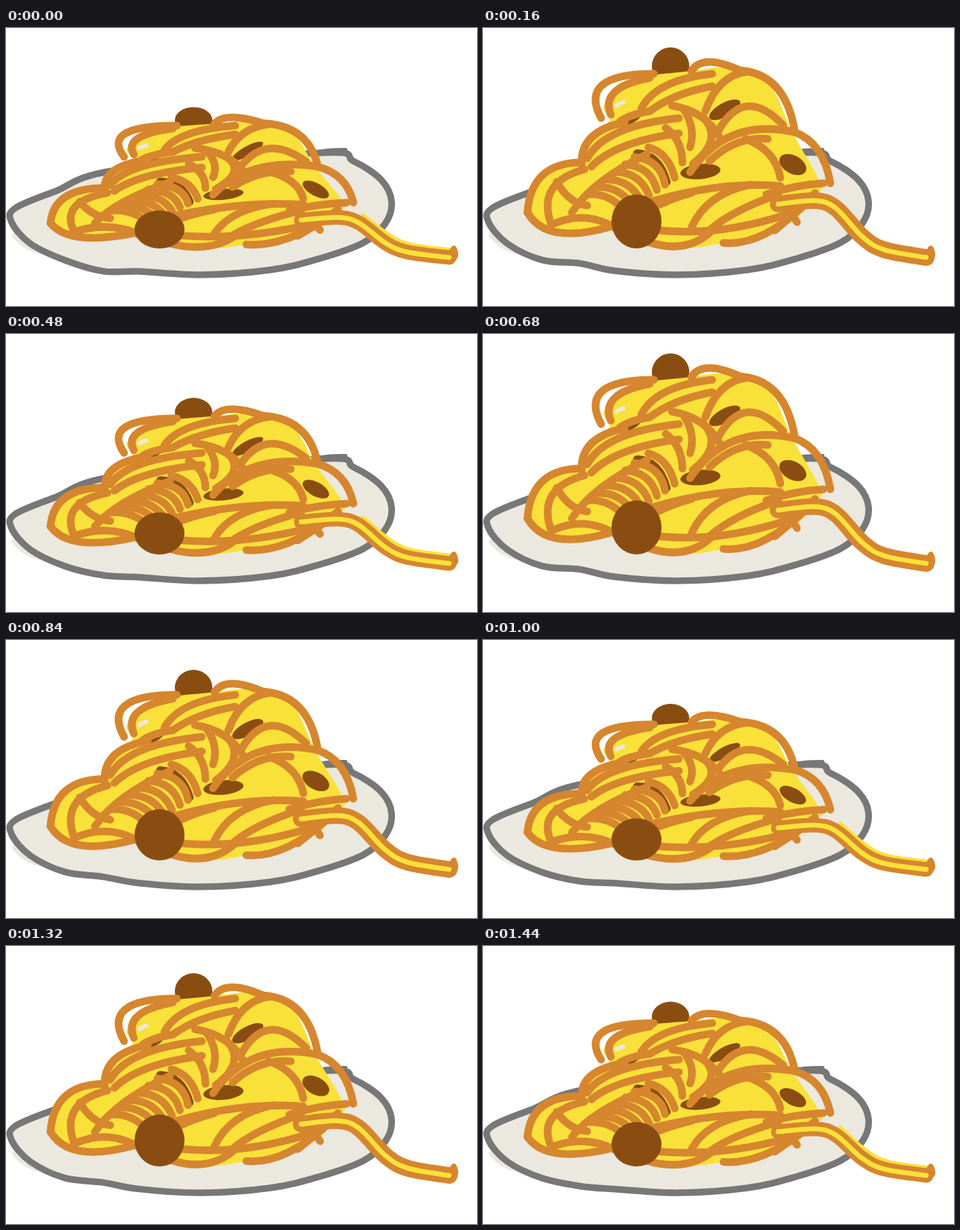
Write an HTML page with a canvas that moves like this. It is 678 px wide and 401 px high and loops after 1520 ms.

```html
<!DOCTYPE html>
<html lang="en">
<head>
<meta charset="utf-8">
<title>Bouncing spaghetti</title>
<style>
html, body { margin: 0; width: 100%; height: 100%; overflow: hidden; background: #fff; }
canvas { display: block; }
</style>
</head>
<body>
<canvas id="stage" width="678" height="401"></canvas>
<script>
const ctx = document.getElementById('stage').getContext('2d');
const ORANGE = '#d6862e', YELLOW = '#f9e13a', BROWN = '#8a4d11', GREY = '#777', CREAM = '#ebe8df';
const LOOP = 1520, BOUNCE = 520, STEP = 40;
const FLOOR = 318, TAIL_FLOOR = 331;

// Height of the pile over one bounce: [ms, share of full height].
const KEYS = [[0, .703], [160, 1], [320, .948], [400, .82], [440, .82], [480, .779], [520, .703]];

const parse = s => s.split(' ').map(p => p.split(',').map(Number));
const mix = (a, b, u) => a + (b - a) * u;
const squash = (pts, h, floor = FLOOR) => pts.map(([x, y]) => [x, floor - (floor - y) * h]);

const RIM = parse('455,180 500,192 540,219 555,250 546,282 514,310 450,333 380,349 280,356 190,351 140,351 85,335 35,311 8,280 13,260 70,236 160,205');
const SPILL = parse('10,296 22,314 48,326 80,325 60,300');
const TAIL = parse('425,254 478,249 508,260 546,301 578,320 638,331');
const BODY = parse('62,260 80,218 138,192 150,156 182,134 174,112 205,76 300,62 355,58 412,82 445,150 484,220 482,240 435,285 345,310 280,316 190,290 90,292');

// Each noodle runs through three points: start, middle, end.
const noodle = s => parse(s);
function fan(first, last, count) {
  const a = parse(first), b = parse(last);
  return Array.from({ length: count }, (_, i) =>
    a.map((p, j) => p.map((v, c) => mix(v, b[j][c], i / (count - 1)))));
}

const UPPER = [
  ...['170,130 172,82 246,66', '184,125 190,92 240,72', '197,135 215,126 240,120'].map(noodle),
  ...fan('228,116 264,83 330,66', '240,120 280,98 330,84', 2),
  ...['320,120 344,80 380,63', '300,62 326,49 372,62', '365,61 421,84 449,150'].map(noodle)
];
const MIDDLE = [
  ...fan('238,172 262,187 276,216', '288,116 300,144 298,172', 3),
  ...['272,112 314,128 342,160', '318,130 328,162 302,196'].map(noodle),
  ...fan('142,198 156,158 204,136', '156,200 205,170 282,152', 2),
  ...['150,188 196,150 282,130', '128,266 170,222 236,182'].map(noodle),
  ...fan('152,240 180,245 204,264', '218,186 248,198 262,226', 6),
  ...['64,266 86,212 142,194', '64,266 108,295 186,286', '97,280 100,232 146,204',
    '106,222 126,246 150,256', '98,284 148,274 196,292'].map(noodle)
];
const LOWER = [
  ...['338,150 380,113 432,140', '298,208 362,154 448,150', '448,150 482,176 500,224',
    '326,192 366,166 410,160', '378,160 412,182 428,216'].map(noodle),
  ...['225,256 330,231 428,228', '408,240 450,229 490,224', '240,262 270,248 300,238'].map(noodle),
  ...fan('300,288 332,248 385,226', '328,290 368,264 425,240', 2),
  ...['192,286 270,315 330,292', '225,288 330,292 440,268', '346,310 402,299 462,256',
    '412,242 432,254 452,280', '478,238 452,264 420,292'].map(noodle)
];

// Sauce pieces: x, y, width radius, height radius, tilt.
const CHUNKS = [[348, 118, 25, 10, -.5], [313, 207, 29, 11, -.1], [446, 197, 21, 13, .5], [214, 131, 15, 6, -.5]];
const TOP_BALL = [270, 55, 27, 27, 0], LOW_BALL = [221, 279, 36, 39, 0];

// Smooth curve through all points.
function curve(pts, closed) {
  const n = pts.length, path = new Path2D();
  const at = i => closed ? pts[(i + n) % n] : pts[Math.max(0, Math.min(n - 1, i))];
  path.moveTo(...pts[0]);
  for (let i = 0; i < (closed ? n : n - 1); i++) {
    const [a, b, c, d] = [at(i - 1), at(i), at(i + 1), at(i + 2)];
    path.bezierCurveTo(
      b[0] + (c[0] - a[0]) / 6, b[1] + (c[1] - a[1]) / 6,
      c[0] - (d[0] - b[0]) / 6, c[1] - (d[1] - b[1]) / 6, c[0], c[1]);
  }
  return path;
}

// Parabola whose middle lies on the second point.
function arc([a, m, b]) {
  const path = new Path2D();
  path.moveTo(...a);
  path.quadraticCurveTo(2 * m[0] - (a[0] + b[0]) / 2, 2 * m[1] - (a[1] + b[1]) / 2, ...b);
  return path;
}

function fill(path, color) {
  ctx.fillStyle = color;
  ctx.fill(path);
}

function stroke(path, color, width) {
  ctx.strokeStyle = color;
  ctx.lineWidth = width;
  ctx.stroke(path);
}

function lump([x, y, rx, ry, tilt], h) {
  const path = new Path2D();
  path.ellipse(x, FLOOR - (FLOOR - y) * h, rx, ry * h, tilt, 0, 7);
  fill(path, BROWN);
}

function drawPlate(h) {
  // The rim dents at the lower left as the pile rises.
  const dent = (x, y) => y > 300 ? 38 * (h - .7) * Math.exp(-(((x - 140) / 30) ** 2)) : 0;
  const rim = curve(RIM.map(([x, y]) => [x, y - dent(x, y)]), true);
  fill(curve(SPILL, true), CREAM);
  fill(rim, CREAM);
  stroke(rim, GREY, 9.5);
  stroke(curve(parse('445,179 468,176 489,175.5')), GREY, 5);
}

function drawTail(h) {
  const core = squash(TAIL, h, TAIL_FLOOR), firm = h > .9;
  if (!firm) stroke(curve(core.slice(2).map(([x, y]) => [x + 6, y - 9])), YELLOW, 9);
  stroke(curve(core), ORANGE, firm ? 24 : 21);
  stroke(curve(core), YELLOW, 7);
  stroke(curve(parse('641,322 645,317 648,328 642,336')), ORANGE, 6);
}

function draw(h) {
  const noodles = set => set.forEach(n => stroke(arc(squash(n, h)), ORANGE, 11));
  ctx.fillStyle = '#fff';
  ctx.fillRect(0, 0, 678, 401);
  drawPlate(h);
  lump(TOP_BALL, h);
  fill(curve(squash(BODY, h), true), YELLOW);
  stroke(arc(squash(parse('192,112 197,109 202,107'), h)), CREAM, 6);
  CHUNKS.forEach(c => lump(c, h));
  noodles(UPPER);
  stroke(arc(squash(parse('222,181 248,192 264,222'), h)), BROWN, 12);
  noodles(MIDDLE);
  noodles(LOWER);
  drawTail(h);
  lump(LOW_BALL, h);
}

function height(ms) {
  const i = KEYS.findIndex(k => k[0] > ms), [t0, a] = KEYS[i - 1], [t1, b] = KEYS[i];
  return mix(a, b, (ms - t0) / (t1 - t0));
}

ctx.lineCap = ctx.lineJoin = 'round';
function tick() {
  const ms = Math.floor(performance.now() % LOOP / STEP) * STEP;
  draw(height(ms % BOUNCE));
  requestAnimationFrame(tick);
}
tick();
</script>
</body>
</html>
```
